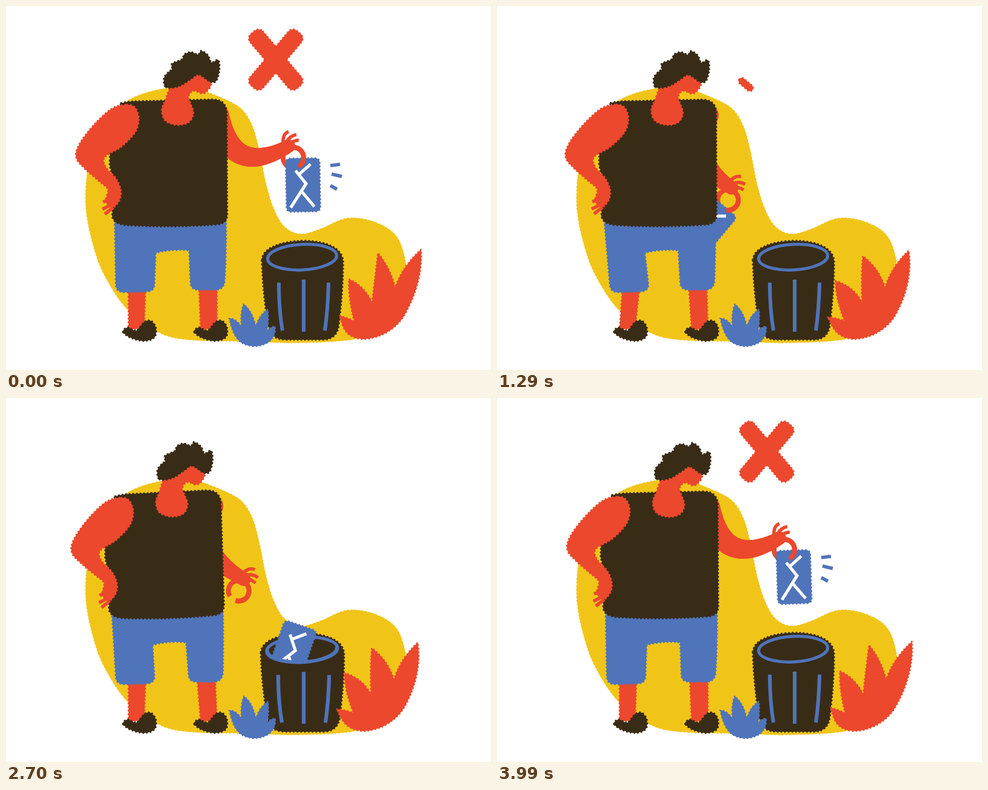
Write an HTML page with a canvas that moves like this. It is 800 px wide and 600 px high and loops after 4020 ms.

```html
<!DOCTYPE html>
<html lang="en">
<head>
<meta charset="utf-8">
<title>Broken phone and bin</title>
<style>
  html, body { margin: 0; width: 100%; height: 100%; overflow: hidden; background: #fff; }
  canvas { display: block; }
</style>
</head>
<body>
<canvas id="stage" width="800" height="600"></canvas>
<script>
const c = document.getElementById('stage').getContext('2d');
const YELLOW = '#f1c518', RED = '#ec482d', DARK = '#392c17', BLUE = '#4f74ba', WHITE = '#fff';
const LOOP = 4020, CYCLE = LOOP / 2, RAD = Math.PI / 180;

const ramp = (t, a, b) => Math.min(1, Math.max(0, (t - a) / (b - a)));
const mix = (a, b, k) => a + (b - a) * k;

// Looping track of [time, ...values], monotone cubic between keys
function track(keys, period) {
  const n = keys.length;
  const at = i => {
    const k = keys[(i + n) % n];
    return [k[0] + Math.floor(i / n) * period, ...k.slice(1)];
  };
  const slope = (a, b, j) => (b[j] - a[j]) / (b[0] - a[0]);
  const tangent = (l, r) => l * r <= 0 ? 0 : 2 * l * r / (l + r);
  return time => {
    const t = time % period;
    let i = n - 1;
    while (keys[i][0] > t) i--;
    const [p, a, b, q] = [at(i - 1), at(i), at(i + 1), at(i + 2)];
    const h = b[0] - a[0], s = (t - a[0]) / h, r = 1 - s;
    return a.slice(1).map((v, m) => {
      const j = m + 1, d = slope(a, b, j);
      const ta = tangent(slope(p, a, j), d), tb = tangent(d, slope(b, q, j));
      return v * (1 + 2 * s) * r * r + b[j] * s * s * (3 - 2 * s) + h * s * r * (ta * r - tb * s);
    });
  };
}

// hip shift, lean, left knee, right knee, wrist x y, elbow control x y, hand turn
const pose = track([
  [0, 0, 0, 0, 0, 466, 231, 372, 285, 0],
  [180, -3, 3, -3, 4, 466, 248, 375, 294, 17],
  [510, -6, 2.5, -5, 3, 466, 246, 372, 286, 17],
  [690, -5, -1.4, 0, -3, 393, 299, 300, 247, 48],
  [900, -9, -3, 4, -5, 340, 305, 280, 260, 55],
  [1290, -3, .2, 5, -2, 387, 300, 310, 252, 40],
  [1500, -2, .5, 0, -2, 437, 241, 365, 305, -2]
], CYCLE);

// centre x y, turn
const phonePose = track([
  [0, 490, 295, -1], [180, 479, 318, 6], [370, 478, 319, 6], [510, 471, 340, 16],
  [690, 472, 416, 19], [820, 472, 492, 19], [950, 300, 345, 45],
  [1290, 346, 364, 40], [1500, 472, 305, -12]
], CYCLE);

// red plant, blue plant
const wind = track([
  [0, .62, 0], [540, 1, 1], [1240, 0, .05], [1880, 1, .9], [2190, .58, 1],
  [2660, 0, .1], [3240, 1, .9], [3510, .87, 1]
], LOOP);

// Closed smooth curve through x,y pairs
function blob(...xy) {
  const n = xy.length / 2, p = new Path2D();
  const pt = i => { const k = (i + n) % n * 2; return [xy[k], xy[k + 1]]; };
  p.moveTo(...pt(0));
  for (let i = 0; i < n; i++) {
    const [a, b, d, e] = [pt(i - 1), pt(i), pt(i + 1), pt(i + 2)];
    p.bezierCurveTo(b[0] + (d[0] - a[0]) / 6, b[1] + (d[1] - a[1]) / 6,
      d[0] - (e[0] - b[0]) / 6, d[1] - (e[1] - b[1]) / 6, ...d);
  }
  p.closePath();
  return p;
}

// Fill with a scalloped rim
function paint(path, color, rim = 3.5) {
  const p = typeof path === 'string' ? new Path2D(path) : path;
  c.fillStyle = c.strokeStyle = color;
  c.fill(p);
  c.lineCap = 'round';
  c.lineWidth = rim;
  c.setLineDash([0, 6]);
  c.stroke(p);
  c.setLineDash([]);
}

function line(d, color, width, cap = 'butt') {
  c.strokeStyle = color;
  c.lineWidth = width;
  c.lineCap = cap;
  c.stroke(new Path2D(d));
}

function place(x, y, turn, draw) {
  c.save();
  c.translate(x, y);
  c.rotate(turn * RAD);
  draw();
  c.restore();
}

const ground = blob(268, 135, 310, 136, 345, 147, 385, 167, 405, 195, 417, 235, 430, 298, 445, 342,
  463, 367, 488, 376, 520, 367, 562, 350, 605, 355, 640, 375, 656, 408, 658, 450, 630, 525, 575, 549,
  480, 555, 400, 553, 300, 550, 250, 537, 200, 500, 163, 445, 144, 395, 132, 335, 134, 275, 147, 220,
  170, 180, 212, 150);
const torso = 'M190 160Q205 157 215 157L340 154Q363 154 364 175L365 345Q364 358 350 360' +
  'Q270 366 195 361Q176 358 175 345L180 300L171 262L173 200Z';
const leftArm = blob(200, 163, 213, 168, 219, 186, 213, 208, 190, 232, 166, 246, 161, 256, 167, 269,
  181, 284, 189, 302, 188, 318, 178, 331, 167, 327, 165, 318, 168, 302, 155, 290, 130, 268, 116, 250,
  121, 228, 145, 196, 175, 169);
const neck = blob(272, 132, 263, 155, 257, 172, 263, 189, 283, 196, 302, 191, 309, 176, 304, 160,
  301, 150, 306, 141, 313, 140, 322, 144, 331, 141, 338, 126, 318, 108, 290, 115);
const hair = blob(262, 132, 261, 118, 269, 108, 274, 104, 274, 95, 290, 88, 294, 80, 305, 76, 317, 80,
  322, 74, 333, 81, 339, 93, 350, 89, 352, 105, 347, 123, 337, 125, 318, 113, 304, 121, 288, 131, 272, 135);
const shoe = blob(193, 537, 201, 530, 215, 535, 228, 521, 239, 519, 247, 530, 245, 546, 228, 552, 206, 547);

function drawCross(t) {
  const u = t % CYCLE, start = t < CYCLE ? 1278 : 1520;
  const stroke = (turn, off, on) => place(445, 88.5, turn, () => {
    const a = u < 1000 ? ramp(u, 490 + off * .5, 640 + off * .5) : 0;
    const b = u < 1000 ? 1 : ramp(u, start + on, start + on + 140);
    if (b <= a) return;
    const p = new Path2D();
    p.roundRect(-59 + 118 * a, -14, 118 * (b - a), 28, 10);
    paint(p, RED, 3);
  });
  stroke(-50, 0, 0);
  stroke(50, 100, 90);
}

function drawBin(u) {
  const squash = u < 690 ? ramp(u, 600, 690) : 1 - ramp(u, 690, 850);
  c.save();
  c.translate(490, 551);
  c.scale(1 + .026 * squash, 1 - .006 * squash);
  c.translate(-490, -551);
  paint('M422 420Q424 480 433 528Q436 549 460 550L525 550Q547 548 549 525Q556 470 556 422' +
    'C556 400 530 387 490 387C450 388 422 400 422 420Z', DARK);
  line('M450 456Q450 500 456 535M491 451L491 537M532 456Q531 500 526 535', BLUE, 6);
  rim(0, 360);
  c.restore();
}

function rim(from, to) {
  c.strokeStyle = BLUE;
  c.lineWidth = 5;
  c.beginPath();
  c.ellipse(488.5, 414, 57, 21, -3 * RAD, from * RAD, to * RAD);
  c.stroke();
}

function drawPhone(u) {
  if (u > 820 && u < 950) return;
  const [x, y, turn] = phonePose(u), falling = u > 400 && u < 900;
  c.save();
  if (falling) {
    c.beginPath();
    c.rect(0, 0, 800, 414);
    c.ellipse(488.5, 414, 57, 21, -3 * RAD, 0, 2 * Math.PI);
    c.clip();
  }
  place(x, y, turn, () => {
    const p = new Path2D();
    p.roundRect(-28, -44, 56, 88, 7);
    paint(p, BLUE, 3);
    line('M13 -34L-6 -18M-12 -24L5 -2L-3 10L-21 37M-3 10L18 36', WHITE, 5);
  });
  c.restore();
  if (falling) rim(0, 180);
}

function ring(x, y, turn, from) {
  place(x, y, turn, () => {
    c.strokeStyle = RED;
    c.lineWidth = 8;
    c.lineCap = 'butt';
    c.beginPath();
    c.arc(8, 19, 17, from * RAD, 60 * RAD);
    c.stroke();
  });
}

function drawRightArm(sx, sy, wx, wy, ex, ey, turn) {
  c.fillStyle = RED;
  for (let i = 0; i <= 40; i++) {
    const k = i / 40, r = 1 - k;
    c.beginPath();
    c.arc(r * r * sx + 2 * r * k * ex + k * k * wx, r * r * sy + 2 * r * k * ey + k * k * wy,
      mix(19, 11, k * k), 0, 7);
    c.fill();
  }
  place(wx, wy, turn, () =>
    line('M-9 -5Q-10 -20 0 -24M-3 -7Q2 -17 13 -19M2 -4Q8 -9 17 -10', RED, 5.5));
  ring(wx, wy, turn, -100);
}

function drawLegs(hip, left, right) {
  paint(`M${202 + left} 465L${230 + left} 465L228 530L202 534Z`, RED, 3);
  paint(`M${318 + right} 460L${348 + right} 460L348 530L321 534Z`, RED, 3);
  paint(shoe, DARK);
  place(117.5, 0, 0, () => paint(shoe, DARK));
  const l = x => x + left, r = x => x + right, h = x => x + hip;
  paint(`M${h(179)} 345L${h(363)} 345Q${h(364)} 400 ${r(361)} 452Q${r(360)} 468 ${r(345)} 468` +
    `L${r(318)} 468Q${r(304)} 468 ${r(304)} 455L${h(302)} 403Q${h(275)} 400 ${h(247)} 407` +
    `L${l(245)} 460Q${l(244)} 471 ${l(230)} 471L${l(195)} 472Q${l(182)} 472 ${l(181)} 460Z`, BLUE, 3);
}

function drawBody(hip, lean) {
  place(265 + hip, 360, lean, () => {
    c.translate(-265, -360);
    paint(torso, DARK);
    paint(leftArm, RED);
    line('M175 317L160 323M175 327L159 335M177 332L163 343', RED, 5.5);
    paint(neck, RED);
    paint(hair, DARK);
  });
}

function drawPlants(t) {
  const [s, b] = wind(t);
  c.save();
  c.transform(1, 0, -.06 * b, 1, .06 * b * 560, 0);
  paint('M368 515Q376 513 388 527Q386 505 392 491Q407 503 412 528Q418 508 432 500' +
    'Q434 515 431 535Q437 528 444 528Q446 545 432 555Q410 567 388 555Q374 545 368 515Z', BLUE, 2.5);
  c.restore();
  const x = (v, k) => v + k * s, y = (v, k) => v - k * s;
  paint(`M${x(546, 8)} ${y(513, 4)}Q${x(557, 5)} 513 ${x(573, 2)} 519` +
    `Q${x(558, 10)} 482 ${x(558, 12)} ${y(453, 5)}Q${x(587, 6)} 461 ${x(602, 3)} 488` +
    `Q${x(600, 14)} 444 ${x(603, 17)} ${y(412, 8)}Q${x(630, 7)} 432 ${x(640, 3)} 464` +
    `Q${x(650, 5)} 430 ${x(679, 9)} ${y(403, 3)}C${x(685, 4)} 440 675 480 655 513` +
    `C638 538 610 549 588 549C568 547 556 540 ${x(546, 8)} ${y(513, 4)}Z`, RED, 3);
}

function draw(t) {
  const u = t % CYCLE;
  const [hip, lean, left, right, wx, wy, ex, ey, turn] = pose(u);
  const a = lean * RAD;
  const sx = 265 + hip + 84 * Math.cos(a) + 180 * Math.sin(a);
  const sy = 360 + 84 * Math.sin(a) - 180 * Math.cos(a);
  c.fillStyle = WHITE;
  c.fillRect(0, 0, 800, 600);
  paint(ground, YELLOW, 2);
  drawCross(t);
  drawBin(u);
  ring(wx, wy, turn, -260);
  drawPhone(u);
  drawRightArm(sx, sy, wx, wy, ex, ey, turn);
  if (u < 75 || u > 1400) {
    place(wx, wy, 0, () => line('M69 32L85 30M71 46L88 50M69 65L80 71', BLUE, 5.5));
  }
  drawLegs(hip, left, right);
  drawBody(hip, lean);
  drawPlants(t);
}

const begin = performance.now();
function tick() {
  draw((performance.now() - begin) % LOOP);
  requestAnimationFrame(tick);
}
tick();
</script>
</body>
</html>
```
